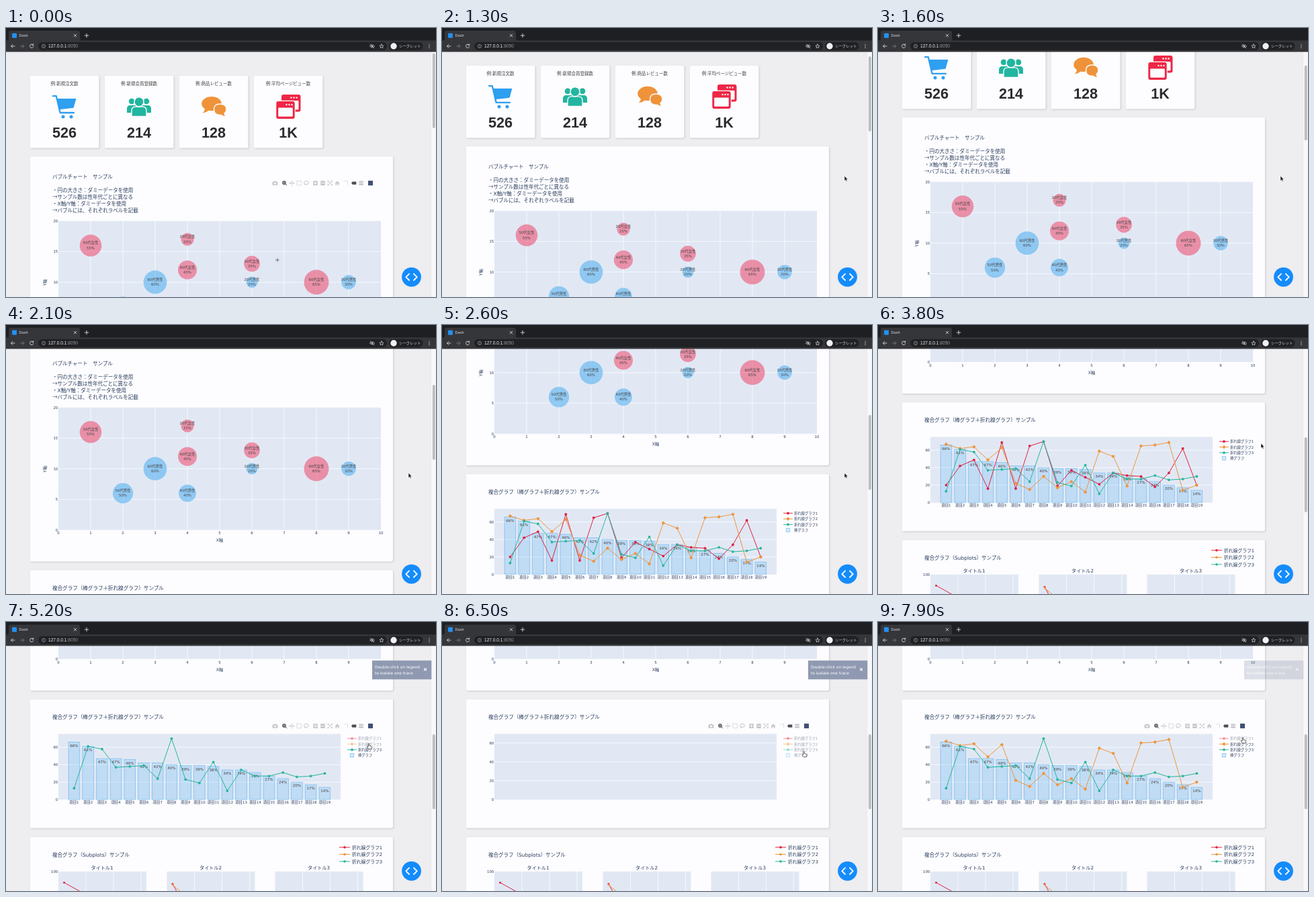
Animation, 640 px wide and 400 px high, one loop 8000 ms. Source, as an HTML page:

```html
<!DOCTYPE html>
<html lang="ja">
<head>
<meta charset="utf-8">
<title>Dash</title>
<style>
html, body { margin: 0; width: 100%; height: 100%; overflow: hidden; background: #eeedf0; }
svg { display: block; width: 100%; height: 100%; }
text { font-family: 'DejaVu Sans', 'Noto Sans CJK JP', 'Noto Sans CJK', sans-serif; white-space: pre; }
.jp { font-family: 'Noto Sans CJK JP', 'Noto Sans CJK', sans-serif; }
.ui { font-family: 'Liberation Sans', 'Noto Sans CJK JP', 'Noto Sans CJK', sans-serif; }
.panel { fill: #fdfcfe; filter: drop-shadow(1.8px 1.8px 1.2px #c9c8cc); }
.plot { fill: #e1e8f4; }
.grid { stroke: #fff; stroke-width: .7; fill: none; }
</style>
</head>
<body>
<svg viewBox="0 0 640 400" xmlns="http://www.w3.org/2000/svg">
  <rect width="640" height="400" fill="#eeedf0"/>
  <g id="page"></g>
  <g id="over"></g>
  <g id="toast"></g>
  <g id="cursor">
    <path id="cross" d="M-2.8 0H2.8M0-2.8V2.8" stroke="#555" stroke-width=".8"/>
    <path id="arrow" d="M0 0V7.2L1.7 5.7 2.8 8.2 4 7.7 2.9 5.3H5Z" fill="#111" stroke="#fff" stroke-width=".5"/>
    <path id="hand" d="M-.8 .8Q0-.5.8.8V3.6L4 4.4Q4.9 4.8 4.6 6L3.9 8.6H-.4L-2.8 5.4Q-2.4 4.3-.8 5.4Z" fill="#fff" stroke="#222" stroke-width=".7"/>
  </g>
</svg>
<script>
const LOOP = 8000;
const INK = '#2a3f5f', RED = '#e0213f', ORANGE = '#ef953b', GREEN = '#28b59b', BLUE = '#5cb4f1';
const $ = id => document.getElementById(id);

// Text centred vertically on y
const text = (x, y, s, size, attrs = '') =>
  `<text x="${x}" y="${y + size * .37}" font-size="${size}" fill="${INK}" ${attrs}>${s}</text>`;
const rect = (x, y, w, h, attrs = '') => `<rect x="${x}" y="${y}" width="${w}" height="${h}" ${attrs}/>`;
const dot = (x, y, r, attrs = '') => `<circle cx="${x}" cy="${y}" r="${r}" ${attrs}/>`;
const path = (d, attrs = '') => `<path d="${d}" ${attrs}/>`;
const stroke = (d, color, w = 1) => path(d, `fill="none" stroke="${color}" stroke-width="${w}" stroke-linecap="round" stroke-linejoin="round"`);
const MID = 'text-anchor="middle"', END = 'text-anchor="end"', JP = 'class="jp"';

function modebar(id, y) {
  const grey = '#c6c7cd', dark = '#4d4f58';
  const zoomBox = (x, d) => rect(x - 3.3, -3.3, 6.6, 6.6, `rx="1" fill="${grey}"`) + stroke(d, '#fdfcfe', .9);
  return `<g id="${id}" transform="translate(0 ${y})">` +
    path('M396.6-2H398.8L399.5-3.2H401.6L402.3-2H404.4V3.2H396.6Z', `fill="${grey}"`) +
    dot(400.5, .5, 1.5, 'fill="#fdfcfe"') +
    dot(414, -.5, 2.3, `fill="none" stroke="${dark}" stroke-width="1.2"`) + stroke('M415.8 1.3L417.8 3.2M413-.5H415M414-1.5V.5', dark) +
    stroke('M421.8 0H428.8M425.3-3.5V3.5M422.8-1L421.8 0 422.8 1M427.8-1L428.8 0 427.8 1', grey, .9) +
    rect(433, -3.2, 6.4, 6.4, `fill="none" stroke="${grey}" stroke-width=".9" stroke-dasharray="1.4 .8"`) +
    `<ellipse cx="447" cy="-.6" rx="3.5" ry="2.5" fill="none" stroke="${grey}"/>` + stroke('M444.5 1.2L445.4 3.2', grey) +
    zoomBox(460.5, 'M458.5 0H462.5M460.5-2V2') + zoomBox(471.5, 'M469.5 0H473.5') +
    stroke('M479-3L485.4 3M485.4-3L479 3M479-1.6V-3H480.4M484-3H485.4V-1.6M479 1.6V3H480.4M484 3H485.4V1.6', grey, .9) +
    path('M489.4 .2L493-3.2 496.6 .2H495.6V3.2H493.8V1H492.2V3.2H490.4V.2Z', `fill="${grey}"`) +
    path('M503-2.8H508.5V3', `fill="none" stroke="${grey}" stroke-dasharray="1.2 1"`) +
    path('M514 0L515.6-2.2H521.3V2.2H515.6Z', `fill="${dark}"`) +
    rect(525.3, -3, 6.6, 2.6, `fill="${grey}"`) + rect(525.3, .5, 6.6, 2.6, `fill="${grey}"`) +
    rect(539, -3.5, 7, 7, 'fill="#3f4f75"') + '</g>';
}

function cards() {
  const icons = [
    stroke('M70 101.2H74.8L80.6 126H101', '#2f9ff0', 2.3) + path('M75.5 105H104.4L100.6 118.8 79 121.3Z', 'fill="#2f9ff0"') +
      dot(85, 132, 2.5, 'fill="#2f9ff0"') + dot(97, 132, 2.5, 'fill="#2f9ff0"'),
    `<g fill="#22b59f">${dot(187, 109, 4.3)}${dot(209, 109, 4.3)}` +
      path('M180 126V120Q180 115 185 115H211Q216 115 216 120V126Z') + '<g stroke="#fdfcfe" stroke-width="1.4">' +
      path('M187 131.5V123Q187 117 193 117H203Q209 117 209 123V131.5Z') + dot(198, 109.8, 7) + '</g></g>',
    `<g fill="#ef933a"><ellipse cx="306" cy="112.5" rx="14.8" ry="10.6"/>` + path('M296 118Q296.5 123 292.5 126 299 126 303 121Z') +
      '<g stroke="#fdfcfe" stroke-width="1.5">' + path('M309.5 121Q309.5 113 318.5 113 328 113 328 121 328 124.5 325 127 325.5 130 328 132 323 132 320.5 129.5 309.5 130 309.5 121Z') + '</g></g>',
    `<g fill="#ee2746">${rect(410, 99, 28.5, 25.5, 'rx="3"')}${rect(413, 108, 22.5, 13.5, 'rx="1" fill="#fdfcfe"')}` +
      rect(401.3, 107.8, 29.4, 28, 'rx="3" fill="#fdfcfe"') + rect(402.3, 109, 27.4, 26, 'rx="3"') +
      rect(405.2, 118.5, 21.6, 13.3, 'rx="1" fill="#fdfcfe"') + '</g><g fill="#fdfcfe">' +
      [417.5, 421.5, 425.5].map((x, i) => dot(x, 114, 1.2) + dot(424.5 + 4 * i, 103.6, 1.2)).join('') + '</g>'
  ];
  const info = [['新規注文数', '526'], ['新規会員登録数', '214'], ['商品レビュー数', '128'], ['平均ページビュー数', '1K']];
  return info.map(([name, n], i) => {
    const x = 36 + 111 * i;
    return rect(x, 71, 102.5, 107.5, 'rx="2" class="panel"') +
      text(x + 51, 83, '例:' + name, 6.5, `${MID} style="fill:#444" ${JP}`) + icons[i] +
      text(x + 51, 155, n, 21.6, `${MID} class="ui" font-weight="bold" style="fill:#2b2b2e"`);
  }).join('');
}

function bubbleChart() {
  const X = v => 78 + 48 * v, Y = v => 469 - 9.1 * v;
  const women = [[1, 16, 50, 55], [4, 17, 20, 25], [4, 12, 40, 45], [6, 13, 30, 35], [8, 10, 60, 65]];
  const men = [[3, 10, 60, 60], [2, 6, 50, 50], [4, 6, 40, 40], [6, 10, 20, 20], [9, 10, 30, 30]];
  let s = rect(36, 191, 540, 325, 'rx="2" class="panel"') + rect(78, 287, 480, 182, 'class="plot"');
  ['バブルチャート　サンプル', '', '・円の大きさ：ダミーデータを使用', '→サンプル数は性年代ごとに異なる',
   '・X軸/Y軸：ダミーデータを使用', '→バブルには、それぞれラベルを記載'].forEach((line, i) => {
    s += text(69, 221.3 + 9.95 * i, line, 7.52, line[0] === '→' ? JP : '');
  });
  for (let i = 0; i <= 10; i++) {
    if (i && i < 10) s += path(`M${X(i)} 287V469`, 'class="grid"');
    s += text(X(i), 473.7, i, 5.4, MID);
  }
  for (let v = 0; v <= 20; v += 5) {
    if (v && v < 20) s += path(`M78 ${Y(v)}H558`, 'class="grid"');
    s += text(77.3, Y(v), v, 5.4, END);
  }
  const bubbles = (list, color, sex) => {
    list.forEach(([x, y, , p]) => { s += dot(X(x), Y(y), 4.06 + .222 * p, `fill="${color}" opacity=".62"`); });
    list.forEach(([x, y, age, p]) => {
      s += text(X(x), Y(y) - 3.9, `${age}代${sex}性`, 5.35, `${MID} style="fill:#444"`) +
        text(X(x), Y(y) + 3.3, p + '%', 5.35, `${MID} style="fill:#444"`);
    });
  };
  bubbles(women, '#ee5a79', '女');
  bubbles(men, BLUE, '男');
  return s + text(318, 484.3, 'X軸', 6.2, MID) +
    `<g transform="translate(58 378.5) rotate(-90)">${text(0, 0, 'Y軸', 6.2, MID)}</g>` + modebar('bar1', 230.6);
}

const BARS = [66, 61, 47, 47, 46, 42, 42, 40, 39, 39, 38, 34, 34, 31, 27, 24, 20, 17, 14];
const LINES = [
  [RED, [20, 42, 49, 16, 69, 16, 65, 70, 19, 37, 29, 21, 34, 31, 30, 18, 34, 62, 20]],
  [ORANGE, [67, 62, 64, 49, 63, 22, 15, 30, 17, 24, 12, 59, 53, 19, 65, 66, 69, 14, 20]],
  [GREEN, [13, 61, 58, 37, 38, 39, 24, 70, 23, 19, 43, 10, 34, 27, 27, 31, 26, 27, 30]]
];
const marker = (x, y, i) => i === 1
  ? path(`M${x - 2.7} ${y}L${x} ${y - 2.7} ${x + 2.7} ${y} ${x} ${y + 2.7}Z`, `fill="${ORANGE}"`)
  : dot(x, y, 1.9, `fill="${LINES[i][0]}"`);
const barStyle = `fill="${BLUE}" fill-opacity=".25" stroke="${BLUE}" stroke-opacity=".7" stroke-width=".8"`;

// on: visibility of the three lines and the bars
function comboChart(on) {
  const lined = on[0] || on[1] || on[2];
  const step = lined ? 20.72 : 420 / 19, x0 = lined ? 101.4 : 78 + step / 2;
  const X = i => x0 + step * i, Y = v => 264 - v * (lined ? 1.295 : 1.404);
  let s = rect(78, 166.5, 420, 97.7, 'class="plot"');
  for (let v = 0; v <= 60; v += 20) {
    if (v) s += path(`M78 ${Y(v)}H498`, 'class="grid"');
    s += text(77.3, Y(v), v, 5.4, END);
  }
  if (on[3]) BARS.forEach((v, i) => {
    s += rect(X(i) - step * .4, Y(v), step * .8, 264 - Y(v), barStyle) + text(X(i), Y(v) + 5.2, v + '%', 5.5, `${MID} style="fill:#444"`);
  });
  if (lined || on[3]) BARS.forEach((v, i) => { s += text(X(i), 268.2, '項目' + (i + 1), 5.4, MID); });
  LINES.forEach(([color, data], k) => {
    if (on[k]) s += stroke('M' + data.map((v, i) => X(i) + ' ' + Y(v)).join('L'), color) + data.map((v, i) => marker(X(i), Y(v), k)).join('');
  });
  on.forEach((shown, k) => {
    const y = 173.2 + 8.35 * k;
    s += `<g opacity="${shown ? 1 : .48}">` +
      (k < 3 ? stroke(`M508.5 ${y}H521.5`, LINES[k][0]) + marker(515, y, k) : rect(512.3, y - 2.7, 5.4, 5.4, barStyle)) +
      text(524, y, k < 3 ? '折れ線グラフ' + (k + 1) : '棒グラフ', 5.3) + '</g>';
  });
  return s;
}

function subplots() {
  let s = rect(36, 320, 540, 200, 'rx="2" class="panel"') + text(69, 346, '複合グラフ（Subplots）サンプル', 7.5) + text(77.3, 371, '100', 5.4, END);
  [78, 239.5, 400.5].forEach((x, i) => {
    s += rect(x, 371, 131, 60, 'class="plot"') + text(x + 65, 365.7, 'タイトル' + (i + 1), 7.1, MID);
    for (let k = 1; k < 4; k++) s += path(`M${x + 41 * k} 371V430`, 'class="grid"');
  });
  s += stroke('M86.5 387.5L120 406', RED) + dot(86.5, 387.5, 1.5, `fill="${RED}"`) +
    stroke('M248 389.5L258 408', RED) + dot(248, 389.5, 1.5, `fill="${RED}"`) +
    stroke('M248 391L266 406', ORANGE) + dot(248, 391, 1.4, `fill="${ORANGE}"`);
  LINES.forEach(([color], k) => {
    const y = 335 + 10.5 * k;
    s += stroke(`M496.5 ${y}H511.5`, color, 1.2) + dot(504, y, 1.8, `fill="${color}"`) + text(515, y, '折れ線グラフ' + (k + 1), 6.8);
  });
  return s;
}

function browser() {
  const pale = '#d9dadd', grey = '#94979c';
  return rect(632.8, 35, 7.2, 365, 'fill="#f8f7f9" stroke="#e6e5e8" stroke-width=".5"') +
    rect(634.8, 37.5, 4, 111.5, 'id="thumb" rx="2" fill="#bebdc0"') +
    dot(603.5, 370.3, 14.4, 'fill="#158cfc"') + stroke('M600 365.6L595.3 370.3 600 375M607 365.6L611.7 370.3 607 375', '#fff', 1.9) +
    rect(0, 0, 640, 35.3, 'fill="#1e1f22"') + path('M1 19Q4 19 4 16V7Q4 4 7 4H107Q110 4 110 7V16Q110 19 113 19Z', 'fill="#35363a"') +
    rect(0, 18.5, 640, 16.8, 'fill="#35363a"') + rect(48, 21, 519, 12, 'rx="6" fill="#202124"') +
    rect(570, 21, 50.5, 12, 'rx="6" fill="#202124"') + rect(9, 7.8, 7, 7, 'rx="1" fill="#2390f0"') +
    text(19.5, 11.3, 'Dash', 5.6, `class="ui" style="fill:${pale}"`) +
    stroke('M101.2 9.4L104.8 13M104.8 9.4L101.2 13M117.2 11.2H122.8M120 8.4V14', pale, .9) +
    stroke('M13 27H7.5M10 24.5L7.5 27 10 29.5', pale, .9) + stroke('M21.5 27H27M24.5 24.5L27 27 24.5 29.5', '#76787c', .9) +
    stroke('M40.3 25.2A2.7 2.7 0 1 0 40.8 27.6M40.7 23.8V25.6H38.9', pale, .9) +
    dot(56, 27, 2.6, `fill="none" stroke="${grey}" stroke-width=".8"`) + stroke('M56 26.8V28.3M56 25.6V25.7', grey, .7) +
    text(63, 27, `127.0.0.1<tspan fill="${grey}">:8050</tspan>`, 6.6, 'class="ui" style="fill:#eee"').replace('style="fill:#eee"', 'style="--c:0"').replace(INK, '#eeeeee') +
    stroke('M541.6 27Q545 23 548.4 27 545 31 541.6 27M542.3 24L547.8 30', pale, .8) + dot(545, 27, 1.1, `fill="${pale}"`) +
    stroke('M559 24L559.9 26.1 562.1 26.3 560.4 27.7 561 29.9 559 28.7 557 29.9 557.6 27.7 555.9 26.3 558.1 26.1Z', pale, .7) +
    dot(577, 27, 4.7, 'fill="#f1f1f3"') + text(585, 27, 'シークレット', 5.4, `${JP} style="fill:${pale}"`) +
    [24.6, 27, 29.4].map(y => dot(630, y, .7, `fill="${pale}"`)).join('');
}

$('page').innerHTML = cards() + bubbleChart() + '<g transform="translate(0 414)">' +
  rect(36, 115, 540, 191.5, 'rx="2" class="panel"') + text(69, 141.3, '複合グラフ（棒グラフ＋折れ線グラフ）サンプル', 7.55) +
  '<g id="combo"></g>' + modebar('bar2', 154.6) + subplots() + '</g>';
$('over').innerHTML = browser();
$('toast').innerHTML = rect(545, 57.3, 88.3, 28, 'fill="#8c97af"') +
  text(549, 66.8, 'Double-click on legend', 5.86, 'style="fill:#fff"') + text(549, 76, 'to isolate one trace', 5.86, 'style="fill:#fff"') +
  stroke('M622.4 69L625.6 72.2M625.6 69L622.4 72.2', '#fff', 1.1);

const clamp = v => Math.max(0, Math.min(1, v));
const ease = u => u < .5 ? 4 * u ** 3 : 1 - 4 * (1 - u) ** 3;
const smooth = u => u * u * (3 - 2 * u);

// Hermite keys: time, offset, speed
const SCROLL = [[1000, 0, 0], [1300, 15, .12], [2100, 164, .26], [2600, 307, .24], [3600, 414, 0]];
function scrollAt(t) {
  if (t <= 1000) return 0;
  const i = SCROLL.findIndex(k => k[0] > t);
  if (i < 0) return 414;
  const [ta, a, va] = SCROLL[i - 1], [tb, b, vb] = SCROLL[i];
  const d = tb - ta, u = (t - ta) / d;
  return a + (b - a) * smooth(u) + d * u * (1 - u) * (va * (1 - u) - vb * u);
}

const MOUSE = [[50, 404, 345], [900, 599, 220], [3600, 599, 220], [3800, 570, 176], [4100, 540, 171], [4550, 540, 171],
  [4750, 540, 179], [5150, 540, 179], [5350, 540, 187], [5750, 540, 187], [5900, 538.5, 192], [6800, 538.5, 192],
  [6950, 540, 187], [7200, 540, 187], [7350, 541, 179], [7650, 541, 179], [7850, 543, 171.5]];
function mouseAt(t) {
  const i = MOUSE.findIndex(k => k[0] > t);
  if (i < 1) return MOUSE[i < 0 ? MOUSE.length - 1 : 0].slice(1);
  const [ta, xa, ya] = MOUSE[i - 1], [tb, xb, yb] = MOUSE[i];
  const u = smooth((t - ta) / (tb - ta));
  return [xa + (xb - xa) * u, ya + (yb - ya) * u];
}

let shown = '';
function draw(t) {
  const s = scrollAt(t);
  $('page').setAttribute('transform', `translate(0 ${-s})`);
  $('thumb').setAttribute('y', 37.5 + .313 * s);

  const on = [t < 4500, t < 5000 || t >= 7600, t < 5500 || t >= 7100, t < 6100 || t >= 6700];
  if (shown !== on.join()) {
    shown = on.join();
    $('combo').innerHTML = comboChart(on);
  }
  $('bar1').setAttribute('opacity', 1 - clamp((t - 650) / 300));
  $('bar2').setAttribute('opacity', clamp((t - 3850) / 300));
  $('toast').setAttribute('opacity', .97 * (ease(clamp((t - 4490) / 700)) - ease(clamp((t - 7490) / 700))));

  const [x, y] = mouseAt(t);
  const kind = t < 1000 && x < 558 && y > 287 ? 'cross' : x > 507 && x < 562 && y > 168 && y < 204 && t > 3600 ? 'hand' : 'arrow';
  $('cursor').setAttribute('transform', `translate(${x} ${y})`);
  for (const id of ['cross', 'arrow', 'hand']) $(id).style.display = id === kind ? '' : 'none';
}

const start = performance.now();
function tick() {
  draw((performance.now() - start) % LOOP);
  requestAnimationFrame(tick);
}
tick();
</script>
</body>
</html>
```
